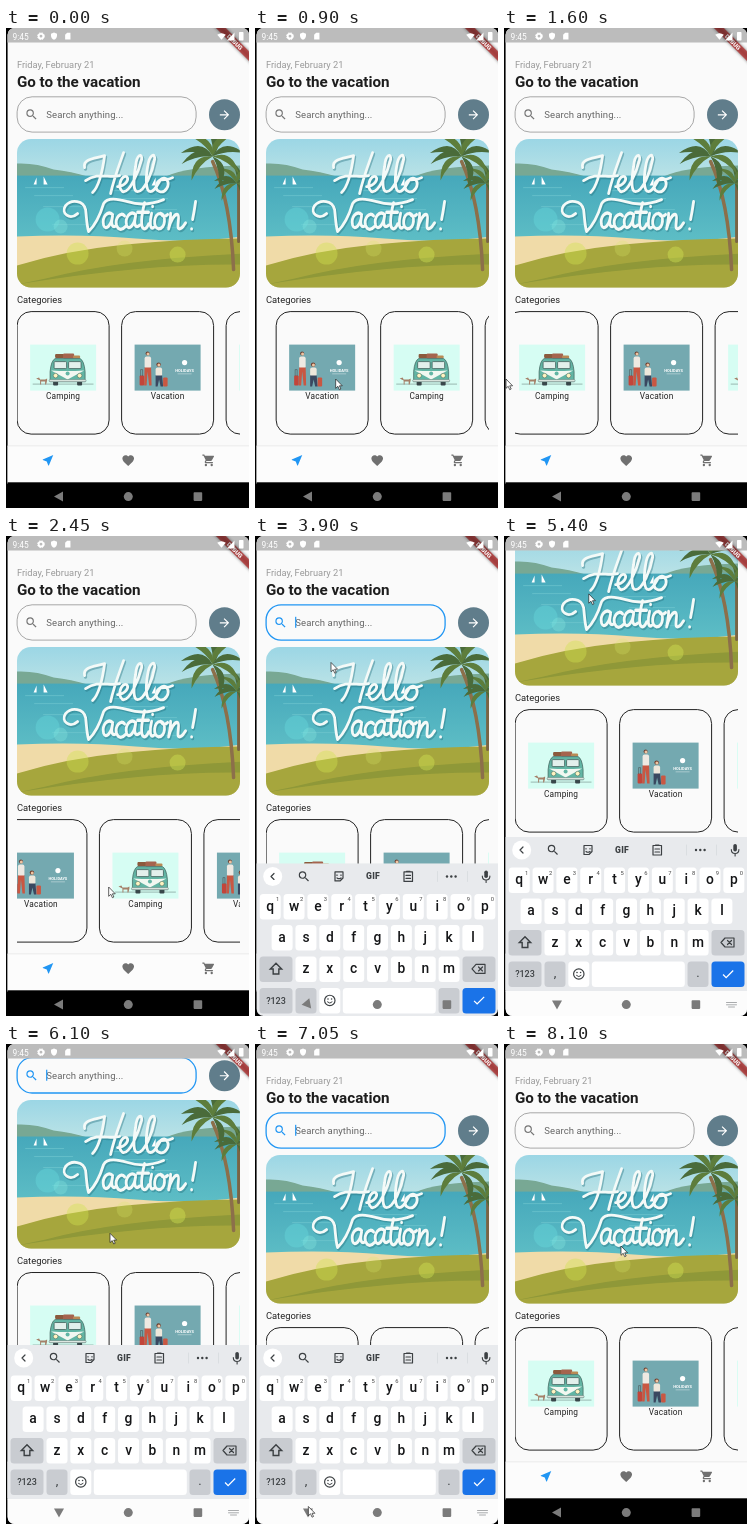
Write an HTML page that moves like this. It is 243 px wide and 480 px high and loops after 8150 ms.

```html
<!DOCTYPE html>
<html lang="en">
<head>
<meta charset="utf-8">
<title>Vacation app</title>
<style>
html, body { margin: 0; height: 100%; overflow: hidden; background: #000; }
svg { display: block; width: 100vw; height: 100vh; font-family: Roboto, sans-serif; }
</style>
</head>
<body>
<svg id="stage" viewBox="0 0 243 480"></svg>
<script>
const ICONS = {
  search: 'M15.5 14h-.79l-.28-.27A6.47 6.47 0 0 0 16 9.5 6.5 6.5 0 1 0 9.5 16c1.61 0 3.09-.59 4.23-1.57l.27.28v.79l5 4.99L20.49 19l-4.99-5zm-6 0C7.01 14 5 11.99 5 9.5S7.01 5 9.5 5 14 7.01 14 9.5 11.99 14 9.5 14z',
  arrow: 'M12 4l-1.41 1.41L16.17 11H4v2h12.17l-5.58 5.59L12 20l8-8z',
  near: 'M21 3L3 10.53v.98l6.84 2.65L12.48 21h.98L21 3z',
  heart: 'M12 21.35l-1.45-1.32C5.4 15.36 2 12.28 2 8.5 2 5.42 4.42 3 7.5 3c1.74 0 3.41.81 4.5 2.09C13.09 3.81 14.76 3 16.5 3 19.58 3 22 5.42 22 8.5c0 3.78-3.4 6.86-8.55 11.54L12 21.35z',
  cart: 'M7 18a2 2 0 1 0 0 4 2 2 0 0 0 0-4zM1 2v2h2l3.6 7.59-1.35 2.45C4.5 15.4 5.5 17 7 17h12v-2H7.42c-.2 0-.3-.2-.22-.37L8.1 13h7.45c.75 0 1.41-.41 1.75-1.03l3.58-6.49A1 1 0 0 0 20 4H5.21l-.94-2H1zm16 16a2 2 0 1 0 0 4 2 2 0 0 0 0-4z',
  check: 'M9 16.2L4.8 12l-1.4 1.4L9 19 21 7l-1.4-1.4z',
  shift: 'M12 4L4 12h4v7h8v-7h4z',
  shield: 'M12 1L3 5v6c0 5.5 3.8 10.7 9 12 5.2-1.3 9-6.5 9-12V5z',
  card: 'M18 2h-8L4 8v14h16V2z',
  wifi: 'M12 21L0 7Q12-2 24 7z'
};
const icon = (name, x, y, fill, size = 14, extra = '') =>
  `<path d="${ICONS[name]}" transform="translate(${x - size / 2} ${y - size / 2}) scale(${size / 24})" fill="${fill}" ${extra}/>`;
const rect = (x, y, w, h, fill, r = 0, extra = '') =>
  `<rect x="${x}" y="${y}" width="${w}" height="${h}" rx="${r}" fill="${fill}" ${extra}/>`;
const circle = (x, y, r, fill, extra = '') => `<circle cx="${x}" cy="${y}" r="${r}" fill="${fill}" ${extra}/>`;
const path = (d, fill, extra = '') => `<path d="${d}" fill="${fill}" ${extra}/>`;
const line = (d, color, width = 1) =>
  path(d, 'none', `stroke="${color}" stroke-width="${width}" stroke-linecap="round" stroke-linejoin="round"`);
const text = (s, x, y, size, fill, extra = '') =>
  `<text x="${x}" y="${y}" font-size="${size}" fill="${fill}" ${extra}>${s}</text>`;
const mid = 'text-anchor="middle"';

function palm(x, y, size) {
  return [-165, -130, -95, -55, -15, 25, 70, 140, 175].map((a, i) =>
    path('M0 0Q14-10 30 3Q14-2 0 0z', i % 2 ? '#5d7d3c' : '#4a6b3a',
      `transform="translate(${x} ${y}) rotate(${a}) scale(${size} ${size * (Math.abs(a) > 90 ? -1.5 : 1.5)})"`)).join('');
}

function lettering() {
  const a = 'c-5-4-11 2-9 9c2 5 8 0 9-8c-2 8 0 11 4 8';
  const hello = 'M79 140C77 131 90 131 99 128C97 143 94 158 87 165M118 125C113 139 108 152 105 166M80 153C92 144 104 151 114 148' +
    'M112 159C120 158 124 152 121 149C116 147 111 159 117 164C124 166 133 144 136 132C137 125 131 126 130 139C128 151 127 164 132 164' +
    'C139 164 147 144 149 132C150 125 144 126 142 139C140 151 140 164 145 164C149 164 152 157 155 152C160 147 165 155 161 161' +
    'C157 167 149 164 151 157C153 149 160 154 167 150';
  const capital = 'M72 186C64 193 55 186 60 178C66 171 78 173 80 182C81 190 81 197 83 204C91 196 95 186 98 176C101 170 112 171 122 174C134 178 148 176 158 172';
  const small = `M107 189${a}M119 190c-4-4-10 2-8 8c2 5 6 4 9 1M130 189${a}` +
    'M139 179c-3 10-5 22 0 22c2 0 3-2 4-4M132 187h11M146 188c-2 7-2 14 2 12M147 182v.1' +
    'M155 188c-7 0-8 12-2 13c7 0 8-12 2-13c2 3 5 3 7 1M165 188c0 5-1 9-2 13c2-7 6-13 9-12c3 1-2 12 2 12c3 0 4-3 6-5' +
    'M190 178c-1 6-2 11-3 15M186 201v.1';
  const words = (color, width) => line(hello + capital, color, width) +
    `<g transform="translate(0 -36) scale(1 1.18)">${line(small, color, width)}</g>`;
  return `<g transform="translate(1 1.5)" opacity=".4">${words('#246f7c', 3.2)}</g>${words('#f4faf8', 2.8)}`;
}

function banner() {
  return `<g clip-path="url(#bannerClip)">
    ${rect(11, 111, 224, 150, 'url(#sky)')}
    ${path('M11 136Q30 135 48 142Q66 144 82 149H11z', '#78a894')}
    ${path('M160 149Q182 139 235 138V150z', '#78a894')}
    ${rect(11, 148, 224, 70, 'url(#sea)')}
    ${[160, 168, 179, 197].map((y, i) => line(`M${20 + i * 9} ${y}h38m50 3h45`, '#74c9d0', .6)).join('')}
    ${path('M11 209Q75 206 130 211T235 209V261H11z', '#f0dba8')}
    ${path('M11 238Q60 223 120 217T235 211V261H11z', '#a6a63d')}
    ${path('M40 251Q110 232 235 226V237Q140 236 11 257z', '#8f9838')}
    ${path('M31 150v7h-3zM38 149v8h4zM150 150v8h-4z', '#fff')}
    ${circle(42, 192, 12, '#67d9dc', 'opacity=".4"')}${circle(55, 199, 7, '#8ceae0', 'opacity=".3"')}
    ${circle(72, 226, 11, '#cfe04e', 'opacity=".4"')}${circle(119, 221, 8, '#d8e66a', 'opacity=".25"')}
    ${circle(172, 227, 8, '#d2e553', 'opacity=".4"')}
    ${line('M207 134C219 160 226 195 228 242', '#8c6f4a', 3.5)}${line('M233 154V214', '#7a6444', 3)}
    ${palm(231, 156, .75)}${palm(207, 129, 1.05)}
    ${lettering()}
  </g>`;
}

// Pictures are drawn in a 66 x 46 box.
const van = rect(0, 0, 66, 46, '#d6fdf3') +
  line('M3 39.5H63', '#6e8580', .6) +
  rect(25, 9.5, 9, 4, '#8b5a3d', 1) + rect(33, 9, 11, 5, '#a5644e', 1) + rect(43, 11, 7, 3, '#b98a55', 1) +
  rect(23, 35, 5, 6, '#39474a', 1) + rect(47, 35, 5, 6, '#39474a', 1) +
  path('M25 14H50Q54 16 55 27V37H20V27Q21 16 25 14z', '#62b5a4', 'stroke="#41605b" stroke-width=".7"') +
  path('M21 26Q37 27 54 26L37.5 35z', '#f2f8f1') +
  rect(24, 17, 12.5, 7, '#e2f0ec', 1, 'stroke="#41605b" stroke-width=".8"') +
  rect(38.5, 17, 12.5, 7, '#e2f0ec', 1, 'stroke="#41605b" stroke-width=".8"') +
  circle(25.5, 31, 2.3, '#fff3c0', 'stroke="#41605b" stroke-width=".5"') +
  circle(49.5, 31, 2.3, '#fff3c0', 'stroke="#41605b" stroke-width=".5"') + circle(37.5, 29, 2, '#62b5a4') +
  rect(19, 35, 37, 2.2, '#dfe8e2', 1, 'stroke="#41605b" stroke-width=".4"') +
  path('M6 34l3-1 1 2h5l2-1v2l-1 4h-1v-3h-4v3h-1v-4z', '#a58069');
const travellers = rect(0, 0, 66, 46, '#74a9b0') +
  circle(13, 9, 2, '#6b4436') + circle(13.4, 9.5, 1.5, '#efc4a2') + rect(10, 12, 6.5, 12, '#eee9e2', 2) +
  path('M10 23h6.5l.5 18h-2.5l-1.5-14-1 14H9.5z', '#c95742') + rect(5, 31, 4.5, 10, '#c2453a', 1) + line('M6 31v-6h2v6', '#444', .5) +
  circle(24, 20, 2.2, '#70402f') + circle(24.3, 20.5, 1.5, '#efc4a2') + rect(21, 23, 6.5, 9, '#eee7db', 2) +
  path('M21 31h6.5l1 11h-2.5l-1.5-7-1.5 7h-2z', '#3a4860') + rect(28.5, 33, 4.5, 9, '#c95742', 1) +
  circle(50, 18, 2.6, '#fff') + text('HOLIDAYS', 50, 27, 4, '#fff', mid + ' font-weight="700"') + rect(43, 29, 14, .6, '#c7dcde');

function card(i) {
  const x = 11.5 + 104.5 * i;
  return `<g transform="translate(${x} 284)">
    ${rect(0, 0, 92, 122.5, '#fafafa', 14, 'stroke="#222"')}
    <g transform="translate(13 33)">${i % 2 ? travellers : van}</g>
    ${text(i % 2 ? 'Vacation' : 'Camping', 46, 87.5, 8.3, '#222', mid + ' letter-spacing=".147"')}
  </g>`;
}

function page() {
  return `<g id="page">
    ${text('Friday, February 21', 11.3, 40.3, 9.3, '#9a9a9a')}
    ${text('Go to the vacation', 11.3, 59.3, 15.2, '#1d1d1d', 'font-weight="700"')}
    <rect id="field" x="11.5" y="69.2" width="179" height="35.3" rx="15" fill="#fafafa"/>
    ${icon('search', 26, 87, '#777', 14, 'id="lens"')}
    ${text('Search anything...', 40.7, 90.2, 9.55, '#666', 'letter-spacing=".088"')}
    ${rect(40.5, 81.2, 1.2, 11, '#2196f3', 0, 'id="caret"')}
    ${circle(218.9, 87.2, 15.5, '#607d8b')}${icon('arrow', 218.9, 87.2, '#fff')}
    ${banner()}
    ${text('Categories', 11.3, 275.3, 9.4, '#222')}
    <g clip-path="url(#listClip)"><g id="list">${[0, 1, 2, 3, 4].map(card).join('')}</g></g>
  </g>`;
}

function keyboard() {
  const dark = '#3c4043', grey = '#c9ccd1', step = 23.85;
  const key = (x, y, w, fill = '#fff') => rect(x - w / 2, y - 12.5, w, 25.5, fill, 3.5);
  const row = (letters, x, y, digits) => [...letters].map((c, i) => {
    const cx = x + i * step;
    return key(cx, y, 21) + text(c, cx, y + 4.3, 13.8, '#151618', mid + ' font-weight="500"') +
      (digits ? text((i + 1) % 10, cx + 7.5, y - 5, 5.8, '#444', mid) : '');
  }).join('');
  return `<g id="keyboard">
    ${rect(1, 301, 242, 181, '#e8eaed')}${rect(1, 455, 242, 26, '#fcfcfc')}
    ${circle(17.7, 314, 9.5, '#fff')}${line('M19 311l-3 3 3 3', dark, 1.2)}
    ${icon('search', 49, 314, dark)}
    ${line('M80 309.5h8v6l-3 3h-5zM82 312.5v.5M86 312.5v.5M82 315.5q2 1.5 4 0', dark, 1.2)}
    ${text('GIF', 118, 317, 8.6, dark, mid + ' font-weight="900" letter-spacing=".3"')}
    ${line('M149 309.5h8.5v9.5H149zM151.5 309h3.5M151 313h4.5M151 316h4.5', dark, 1.2)}
    ${line('M182.5 309v10M212.5 309v10', '#d5d8dc', .7)}
    ${[192, 196.3, 200.6].map(x => circle(x, 314, 1.2, dark)).join('')}
    ${rect(229.3, 308, 3.6, 7.5, dark, 1.8)}${line('M227.3 313.5q0 4 3.8 4t3.8-4M231.1 317.5v2.5', dark, 1.1)}
    ${row('qwertyuiop', 15.2, 344, true)}${row('asdfghjkl', 27.1, 375)}${row('zxcvbnm', 51, 406.5)}
    ${key(21, 406.5, 33, grey)}${icon('shift', 21, 406.5, 'none', 17, `stroke="${dark}" stroke-width="2"`)}
    ${key(224, 406.5, 33, grey)}${line('M217 406.5l4-4.5h9v9h-9zM223.5 404.5l4 4M227.5 404.5l-4 4', dark, 1.2)}
    ${key(21, 438, 33, grey)}${text('?123', 21, 441.2, 9, dark, mid + ' font-weight="500"')}
    ${key(51, 438, 21, grey)}${text(',', 51, 441, 13, dark, mid)}
    ${key(74.8, 438, 21)}${circle(74.8, 438, 5.2, 'none', `stroke="${dark}" stroke-width="1.2"`)}
    ${circle(73, 436.5, .8, dark)}${circle(76.6, 436.5, .8, dark)}${line('M72.5 439.5q2.3 2.5 4.6 0', dark)}
    ${key(134.3, 438, 93)}
    ${key(194, 438, 21, grey)}${text('.', 194, 441, 13, dark, mid)}
    ${key(224, 438, 33, '#1a73e8')}${icon('check', 224, 438, '#fff', 15)}
  </g>`;
}

const ribbon = `<g transform="translate(243 0) rotate(45)">
  ${rect(-36, 16.4, 72, 7, '#000', 0, 'opacity=".5" filter="url(#soft)"')}${rect(-36, 16.4, 72, 7, '#b71c1c', 0, 'opacity=".65"')}
  ${text('DEBUG', 0, 22.1, 6, '#fff', mid + ' font-weight="900"')}</g>`;
const statusBar = rect(1, 0, 242, 14.5, '#000', 0, 'opacity=".25"') + text('9:45', 6.5, 11.5, 8.4, '#fff') +
  circle(35, 8.2, 2.3, 'none', 'stroke="#fff" stroke-width="1.8"') + circle(35, 8.2, 3.4, 'none', 'stroke="#fff" stroke-dasharray="1.5 1.2"') +
  icon('shield', 48, 8.2, '#fff', 8) + icon('card', 61.8, 8.2, '#fff', 8) +
  icon('wifi', 215.5, 8.5, '#fff', 8.5) + path('M221 12.5l7.5-8v8z', '#fff') + rect(233, 4, 4.5, 8.5, '#fff', .7);

const $ = id => document.getElementById(id);
$('stage').innerHTML = `
  <defs>
    <linearGradient id="sky" x2="0" y2="1"><stop stop-color="#9bd6e5"/><stop offset=".25" stop-color="#b9e2e6"/></linearGradient>
    <linearGradient id="sea" x2="0" y2="1"><stop stop-color="#46a8bb"/><stop offset="1" stop-color="#5fbfc6"/></linearGradient>
    <filter id="soft" x="-20%" y="-100%" width="140%" height="300%"><feGaussianBlur stdDeviation="1.6"/></filter>
    <clipPath id="bannerClip"><rect x="11.4" y="111.4" width="223" height="148.6" rx="14"/></clipPath>
    <clipPath id="listClip"><rect x="11.4" y="283" width="223" height="125"/></clipPath>
    <clipPath id="screenClip"><rect x="1.6" y="0" width="241.4" height="480" rx="7"/></clipPath>
  </defs>
  <g clip-path="url(#screenClip)">
    ${rect(1, 0, 242, 456, '#fafafa')}
    ${page()}
    ${rect(1, 0, 242, 14.5, '#fafafa')}
    ${ribbon}${statusBar}
    ${rect(1, 418, 242, 37, '#fcfcfc')}${rect(1, 417.5, 242, .8, '#e8e8e8')}
    ${icon('near', 42, 432.3, '#2196f3')}${icon('heart', 122.2, 432.5, '#707070')}${icon('cart', 202.8, 432.3, '#707070')}
    ${rect(1, 454.3, 242, 26, '#000')}
    ${keyboard()}
    <g fill="#7b7b7b">
      <path id="back" d="M-5 0L4-5V5z"/>
      <circle cx="122.3" cy="468.6" r="4.5"/><rect x="187.6" y="464.3" width="8.6" height="8.6" rx=".8"/>
    </g>
    <g id="switcher">${line('M222.5 466.5h10M222.5 468.8h10M224.5 471h6', '#a9abad', 1)}</g>
  </g>
  ${path('M0 0V9.3L2.2 7.3 3.7 10.7 5.2 10 3.7 6.8H6.6z', '#fff', 'id="pointer" stroke="#222" stroke-width=".7"')}`;

// Keys are [time, value, power]; power shapes the ease-out into that key.
const LIST = [[450, 0], [900, 94, 1], [1450, 218, 2], [1650, 218], [2450, 127.3, 1], [2950, 0, 2.5]];
const SCROLL = [[4450, 0], [4700, 110, 1], [5750, 110], [6100, 55.3, 1], [6600, 0, 2]];
const KEYBOARD = [[3745, 180], [3998, 0, 2], [7300, 0], [7550, 180, 2]];
const POINTER_X = [[50, 200], [350, 190, 2], [450, 190], [900, 81, 1], [1400, 2, 2], [1650, 2], [2450, 102, 1], [2850, 237, 2], [3150, 237],
  [3600, 76, 2], [4700, 76, 1], [5300, 82], [6100, 104, 1], [6500, 110, 1], [7150, 52, 2], [7350, 52], [7800, 140, 2], [7900, 140], [8100, 117, 2]];
const POINTER_Y = [[50, 89], [350, 345, 2], [900, 351, 1], [2850, 351], [3150, 351], [3600, 88, 2], [3700, 88], [3900, 126, 1], [4300, 215, 2],
  [4450, 215], [4700, 108, 1], [5050, 4, 2], [5300, 12], [5700, 116, 2], [6100, 189, 1], [6450, 290, 1], [7150, 466, 2], [7350, 466],
  [7800, 215, 2], [7900, 215], [8100, 202, 2]];

function at(keys, t) {
  const next = keys.findIndex(k => k[0] > t);
  if (next < 0) return keys[keys.length - 1][1];
  if (!next) return keys[0][1];
  const [t0, v0] = keys[next - 1], [t1, v1, power = 1] = keys[next];
  return v0 + (v1 - v0) * (1 - (1 - (t - t0) / (t1 - t0)) ** power);
}
const move = (id, x, y, extra = '') => $(id).setAttribute('transform', `translate(${x} ${y})${extra}`);
const show = (id, on) => $(id).setAttribute('visibility', on ? 'visible' : 'hidden');

function draw(now) {
  const t = now % 8150, drop = at(KEYBOARD, t), focused = t >= 3700 && t < 7300;
  move('list', -at(LIST, t), 0);
  move('page', -.4, -.4 - at(SCROLL, t));
  move('keyboard', 0, drop);
  show('keyboard', drop < 180);
  show('switcher', drop < 5);
  move('back', 53, 468.6, ` rotate(${270 * (1 - drop / 180)})`);
  $('field').setAttribute('stroke', focused ? '#2196f3' : '#929292');
  $('field').setAttribute('stroke-width', focused ? 1.3 : .8);
  $('lens').setAttribute('fill', focused ? '#2196f3' : '#777');
  show('caret', focused && Math.floor((t - 3700) / 500) % 2 === 0);
  show('pointer', t >= 50);
  move('pointer', at(POINTER_X, t), at(POINTER_Y, t));
  requestAnimationFrame(draw);
}
draw(0);
</script>
</body>
</html>
```
